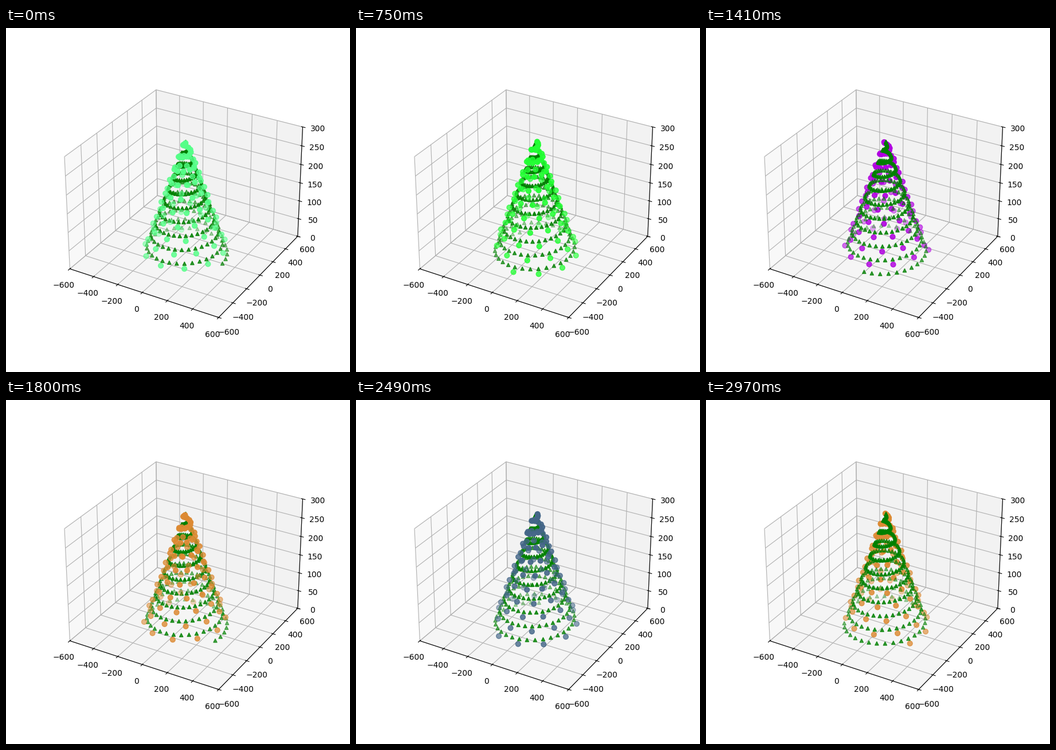
Write a matplotlib script that moves like this. It is 600 by 600 pixels and loops after 3000 ms.

```python
import numpy as np
import matplotlib.pyplot as plt
from matplotlib.animation import FuncAnimation

HEIGHT = 300
FRAMES = 100
HOLD = 18  # frames per light colour
LIGHTS = ["#55ff88", "#22ff33", "#b000e0", "#dd8a33", "#446688", "#dd8a33"]

fig = plt.figure(figsize=(6, 6), dpi=100)
ax = fig.add_subplot(projection="3d")
ax.set(xlim=(-600, 600), ylim=(-600, 600), zlim=(0, HEIGHT))
layers = []


def spiral(z, turn, extra=0):
    angle = z / 5 + turn
    radius = HEIGHT - z + extra
    return radius * np.cos(angle), radius * np.sin(angle), z


def animate(frame):
    while layers:
        layers.pop().remove()
    turn = frame / 10
    needles = spiral(np.arange(HEIGHT), turn)
    bulbs = spiral(np.arange(1, HEIGHT, 3), turn + 2, extra=10)
    layers.append(ax.scatter(*needles, c="green", marker="^"))
    layers.append(ax.scatter(*bulbs, c=LIGHTS[frame // HOLD], marker="o", s=40))
    return layers


anim = FuncAnimation(fig, animate, frames=FRAMES, interval=30,
                     init_func=lambda: animate(0), repeat=True, repeat_delay=0)
plt.show()
```
